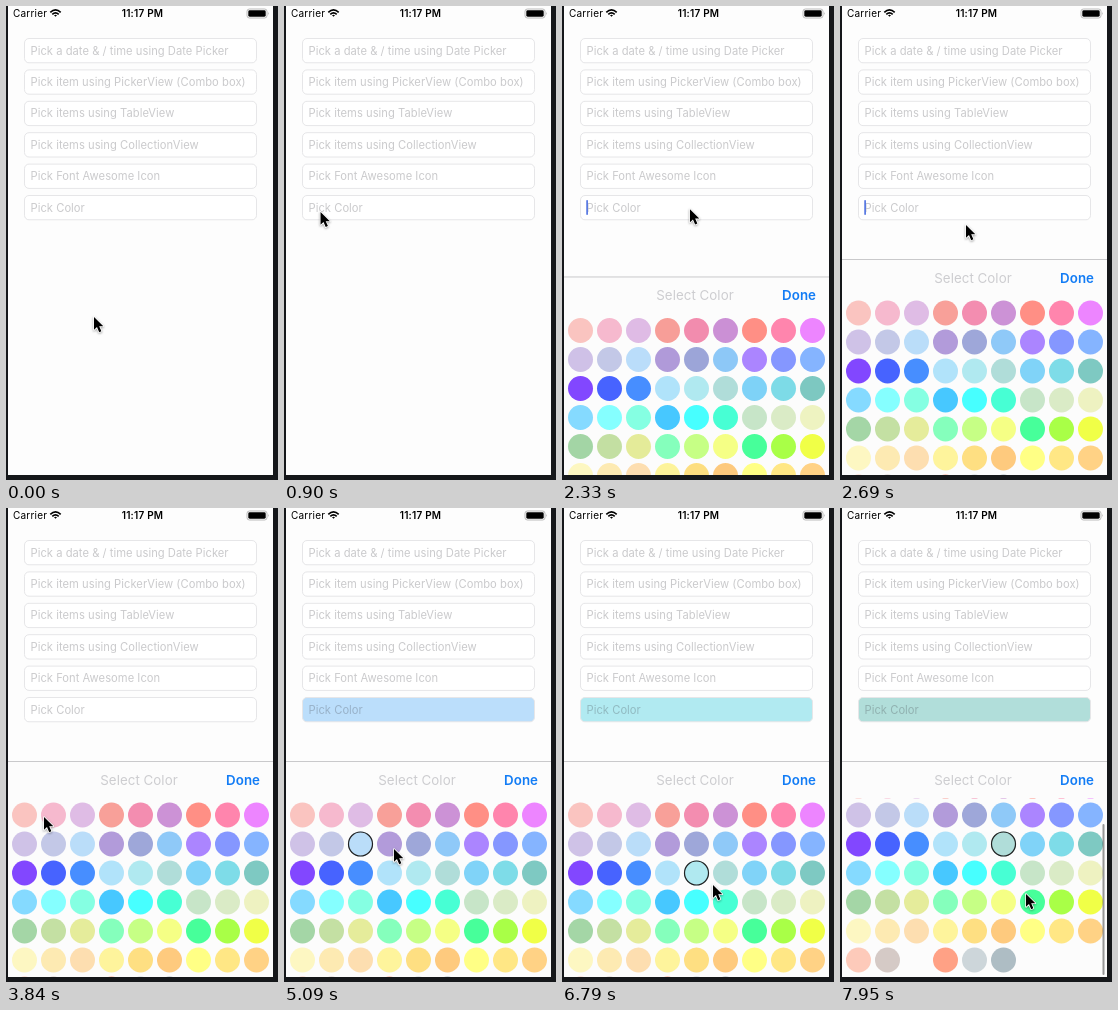
Recreate the animation shown at these times as an HTML page. Size 272x474 px, loop 8 s.

```html
<!DOCTYPE html>
<html lang="en">
<head>
<meta charset="utf-8">
<title>Color picker demo</title>
<style>
  html, body { margin: 0; height: 100%; overflow: hidden; background: #fdfdfd; }
  svg { display: block; width: 272px; height: 474px; font-family: Inter, sans-serif; }
  .status { font-size: 10px; letter-spacing: .22px; }
  .field { fill: #fff; stroke: #e6e6e8; }
  .hint { font-size: 11.2px; letter-spacing: .03px; fill: rgba(60, 60, 67, .27); }
  .bar { font-size: 13.3px; letter-spacing: .05px; }
</style>
</head>
<body>
<svg viewBox="0 0 272 474">
  <defs><clipPath id="list"><rect x="2" y="290" width="265" height="184"/></clipPath></defs>
  <rect width="272" height="474" fill="#fdfdfd"/>

  <text class="status" x="7" y="11">Carrier</text>
  <g fill="none" stroke="#000" stroke-width="1.7">
    <path d="M44.3 6.3Q49.5 1.6 54.7 6.3M46.3 8.3Q49.5 5.4 52.7 8.3"/>
    <path d="M48 9.2Q49.5 8.2 51 9.2L49.5 10.8Z" fill="#000" stroke="none"/>
  </g>
  <text class="status" x="136.5" y="11" text-anchor="middle" font-weight="600">11:17 PM</text>
  <rect x="241" y="3" width="20" height="9" rx="2.4" fill="none" stroke="#aaa" stroke-width=".8"/>
  <rect x="242.3" y="4.3" width="17.4" height="6.4" rx="1.4"/>
  <path d="M262 6q1.4 1.5 0 3z" fill="#aaa"/>

  <g id="fields"></g>
  <rect id="caret" x="24.3" y="194" width="1.6" height="15" rx=".8" fill="#4a6ee0"/>

  <g id="sheet">
    <rect x="2" y="253" width="265" height="220" fill="#fcfcfc"/>
    <path d="M2 253.5H267" stroke="#c9c9cb"/>
    <text class="bar" x="133" y="277" text-anchor="middle" fill="#cdcdd0">Select Color</text>
    <text class="bar" x="254" y="277" text-anchor="end" font-weight="600" fill="#127cf5">Done</text>
    <g clip-path="url(#list)">
      <g id="colors"></g>
      <rect id="scrollbar" x="262.5" width="2" height="151" rx="1" fill="#000" fill-opacity=".4"/>
    </g>
  </g>

  <path d="M0 0H2V469H267V0H272V474H0Z" fill="#15171a"/>
  <g id="cursor">
    <path d="M0 0V14.6L3.4 11.5L5.9 17.2L8.4 16.1L5.9 10.6H10.6Z" transform="scale(.88)" stroke="#fff"
      stroke-width="1.8" stroke-linejoin="round" paint-order="stroke"
      style="filter: drop-shadow(0 1px 1px rgba(0,0,0,.35))"/>
  </g>
</svg>
<script>
const LOOP = 8000, OPEN = 2099, SCROLL = 7440, COLUMNS = 9, PITCH = 29;
const $ = id => document.getElementById(id);

function set(el, attrs) {
  for (const name in attrs) el.setAttribute(name, attrs[name]);
  return el;
}

function add(parent, tag, attrs, text = '') {
  const el = set(document.createElementNS('http://www.w3.org/2000/svg', tag), attrs);
  el.textContent = text;
  return parent.appendChild(el);
}

const fields = [
  'Pick a date & / time using Date Picker', 'Pick item using PickerView (Combo box)',
  'Pick items using TableView', 'Pick items using CollectionView',
  'Pick Font Awesome Icon', 'Pick Color'
].map((label, i) => {
  const y = 32.5 + i * 31.4;
  const box = add($('fields'), 'rect', { class: 'field', x: 18.5, y, width: 232, height: 24.3, rx: 4.5 });
  add($('fields'), 'text', { class: 'hint', x: 24.5, y: y + 16 }, label);
  return box;
});
const colorField = fields[5];

// Shades of a family: two translucent tints of its base, two accents of its hue
const light = ([base]) => base + '4d';
const medium = ([base]) => base + '80';
const accent = ([, hue]) => `hsl(${hue} 100% 76%)`;
const vivid = ([, hue]) => `hsl(${hue} 100% 64%)`;

const families = [
  [['#f44336', 5], ['#e91e63', 340], ['#9c27b0', 291]],
  [['#673ab7', 259], ['#3f51b5', 231], ['#2196f3', 217]],
  [['#03a9f4', 198], ['#00bcd4', 180], ['#009688', 166]],
  [['#4caf50', 147], ['#8bc34a', 88], ['#cddc39', 65]],
  [['#ffeb3b', 60], ['#ffc107', 48], ['#ff9800', 38]]
];
const orange = ['#ff5722', 14], brown = ['#795548'], slate = ['#607d8b'];

const palette = families.flatMap((trio, i) => {
  const shades = [light, medium, accent];
  if (i > 0 && i < 4) shades.push(vivid);
  return shades.flatMap(shade => trio.map(shade));
}).concat(light(orange), light(brown), 'none', accent(orange), light(slate), medium(slate));

const center = i => ({ cx: 18.5 + i % COLUMNS * PITCH, cy: 307 + Math.floor(i / COLUMNS) * PITCH });
palette.forEach((fill, i) => add($('colors'), 'circle', { ...center(i), r: 12.5, fill }));
const ring = add($('colors'), 'circle', { r: 12, fill: 'none', stroke: '#222', 'stroke-width': 1.2 });

// Swatches tapped one after another at a steady pace
const taps = [1, 11, 12, 13, 22, 23], FIRST_TAP = 4140, TAP_GAP = 560;

// Cursor stops: [time, x, y]
const stops = [
  [60, 88, 311], [850, 35, 206], [1520, 128, 203], [2300, 128, 203], [2690, 126, 219],
  [3800, 38, 309], [4100, 38, 309], [5090, 110, 341], [5760, 134, 340], [6350, 136, 371],
  [6790, 151, 377], [SCROLL, 186, 412], [7850, 186, 386]
];

const clamp = v => Math.min(1, Math.max(0, v));
const ease = v => (v = clamp(v), v * v * (3 - 2 * v));

// Each leg adds its eased share of the way to the next stop
function cursorAt(t) {
  let [, x, y] = stops[0];
  stops.slice(1).forEach(([t1, x1, y1], i) => {
    const [t0, x0, y0] = stops[i], k = ease((t - t0) / (t1 - t0));
    x += (x1 - x0) * k;
    y += (y1 - y0) * k;
  });
  return [x, y];
}

function caretOpacity(t) {
  const phase = t % 1000;
  return t < OPEN ? 0 : clamp((phase - 120) / 100) * clamp((780 - phase) / 80);
}

function draw(t) {
  // Critically damped spring for the sheet
  const w = Math.max(0, t - OPEN) * .018;
  const drop = 220 * (1 + w) * Math.exp(-w);
  set($('sheet'), { transform: `translate(0 ${drop < .3 ? 0 : drop})` });

  const scroll = ease((t - SCROLL) / 410);
  set($('colors'), { transform: `translate(0 ${-PITCH * scroll})` });
  set($('scrollbar'), { y: 291 + 25 * scroll, opacity: t > SCROLL ? 1 : 0 });

  const tap = Math.min(Math.floor((t - FIRST_TAP) / TAP_GAP), taps.length - 1);
  set(ring, { ...center(taps[Math.max(tap, 0)]), opacity: tap < 0 ? 0 : 1 });
  colorField.style.fill = tap < 0 ? '' : palette[taps[tap]];

  set($('caret'), { opacity: caretOpacity(t) });
  set($('cursor'), { transform: `translate(${cursorAt(t)})` });
}

const start = performance.now();
(function tick() {
  draw((performance.now() - start) % LOOP);
  requestAnimationFrame(tick);
})();
</script>
</body>
</html>
```
